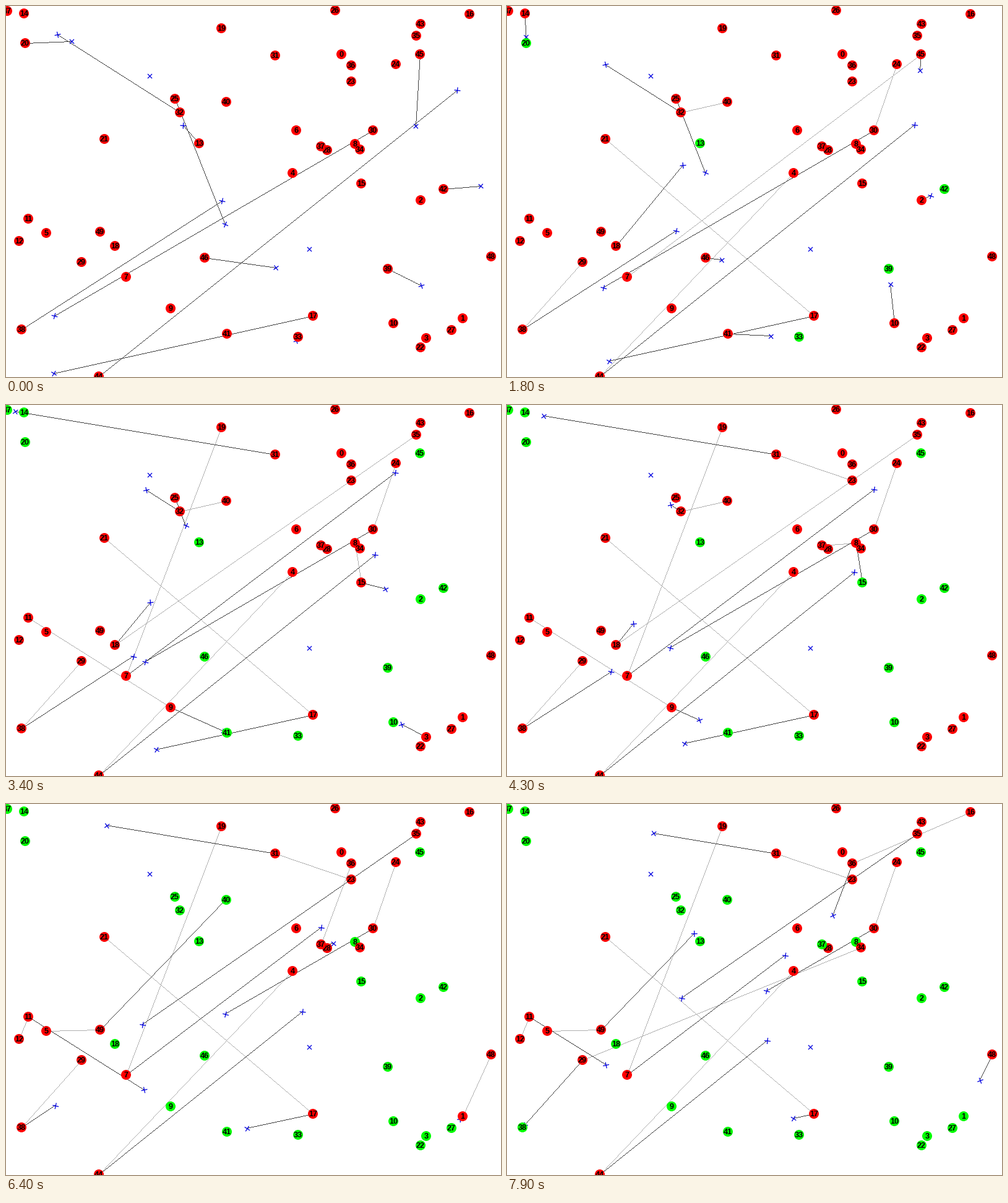
Recreate the animation shown at these times as a matplotlib script. Size 800 by 600 pixels, loop 8000 ms.

```python
import numpy as np
import matplotlib.pyplot as plt
from matplotlib.animation import FuncAnimation
from matplotlib.collections import LineCollection
from matplotlib.patches import Circle

W, H, DPI = 800, 600, 100
FRAMES, INTERVAL = 80, 100
SPEED, REACH, PLAN_EVERY = 5, 3.5, 10
PX = 72 / DPI
RED, GREEN, BLUE = "#ff0000", "#00ff00", "#0000e0"
NOW_GRAY, LATER_GRAY = 64, 176

# scattered task sites, labelled by their index
TASKS = np.array([
    (542, 78), (738, 505), (670, 314), (679, 537), (463, 270),
    (65, 367), (469, 201), (194, 438), (564, 223), (266, 489),
    (626, 513), (36, 344), (21, 380), (312, 222), (29, 12),
    (574, 287), (749, 13), (496, 501), (176, 388), (348, 36),
    (31, 60), (159, 215), (670, 552), (558, 122), (630, 94),
    (273, 150), (532, 7), (720, 524), (519, 233), (122, 414),
    (593, 201), (435, 80), (281, 172), (472, 535), (572, 232),
    (663, 48), (558, 96), (509, 227), (25, 523), (617, 425),
    (356, 155), (357, 530), (707, 296), (670, 29), (150, 599),
    (669, 78), (321, 407), (2, 8), (784, 405), (152, 365),
], float)
SPARE = {0, 6, 26, 28}


class Robot:
    """Visits its stops, then makes some hops to the nearest open task."""

    def __init__(self, x, y, stops=(), hops=0):
        self.pos = np.array([x, y], float)
        self.queue = list(stops)
        self.hops = hops
        self.step = 0
        self.angle = 0.0

    def plan(self, free):
        for _ in range(self.hops):
            here = TASKS[self.queue[-1]]
            task = min(free, key=lambda k: np.hypot(*(TASKS[k] - here)))
            self.queue.append(task)
            free.remove(task)

    def task(self, t, ahead=0):
        """Task number, once its planning round has come."""
        k = self.step + ahead
        if k < len(self.queue) and t >= k * PLAN_EVERY:
            return self.queue[k]
        return None

    def face(self, t):
        task = self.task(t)
        if task is not None:
            dx, dy = TASKS[task] - self.pos
            self.angle = np.arctan2(dy, dx)

    def advance(self, t, done):
        task = self.task(t)
        if task is None:
            return
        gap = TASKS[task] - self.pos
        dist = np.hypot(*gap)
        if dist < REACH:
            done.add(task)
            self.step += 1
        else:
            self.pos = self.pos + gap / dist * SPEED
        self.face(t)

    def cross(self):
        mid = self.pos + 0.5
        for turn in (np.pi / 4, -np.pi / 4):
            a = self.angle + turn
            arm = 5 * np.array([np.cos(a), np.sin(a)])
            yield [mid - arm, mid + arm]


def make_robots():
    robots = [
        Robot(83, 46, [32, 40, 49], hops=1),
        Robot(106, 57, [20, 14, 47, 31, 23]),
        Robot(286, 193, [13, 18, 35], hops=1),
        Robot(469, 541, [33, 41, 9, 11], hops=1),
        Robot(349, 315, [38, 29, 34]),
        Robot(354, 353, [25]),
        Robot(436, 423, [46]),
        Robot(78, 501, [30, 24]),
        Robot(77, 594, [17, 21]),
        Robot(729, 136, [44, 4]),
        Robot(662, 194, [45, 7, 19]),
        Robot(767, 291, [42], hops=6),
        Robot(671, 452, [39], hops=6),
        Robot(232, 113),
        Robot(490, 393),
    ]
    taken = SPARE.union(*(r.queue for r in robots))
    free = [k for k in range(len(TASKS)) if k not in taken]
    for r in robots:
        r.plan(free)
        r.face(0)
    return robots


def snapshot(robots, t, done):
    now, later, marks = [], [], []
    for r in robots:
        a, b = r.task(t), r.task(t, 1)
        if a is not None:
            now.append((r.pos, TASKS[a]))
            if b is not None:
                later.append((TASKS[a], TASKS[b]))
        marks += r.cross()
    return now, later, marks, set(done)


def simulate():
    robots, done = make_robots(), set()
    states = [snapshot(robots, 0, done)]
    for t in range(1, FRAMES):
        for r in robots:
            r.advance(t, done)
        states.append(snapshot(robots, t, done))
    return states


def hairline(canvas, a, b, gray):
    """One-pixel line without smoothing."""
    a, b = np.floor(a), np.floor(b)
    n = int(np.abs(b - a).max()) + 1
    x, y = np.rint(np.linspace(a, b, n)).astype(int).T
    canvas[y.clip(0, H - 1), x.clip(0, W - 1)] = gray


STATES = simulate()

fig = plt.figure(figsize=(W / DPI, H / DPI), dpi=DPI, facecolor="white")
ax = fig.add_axes([0, 0, 1, 1])
paths = ax.imshow(np.full((H, W), 255, np.uint8), cmap="gray", vmin=0,
                  vmax=255, extent=(0, W, H, 0), interpolation="nearest",
                  aspect="auto", zorder=1)
ax.set_xlim(0, W)
ax.set_ylim(H, 0)
ax.axis("off")

crosses = LineCollection([], colors=BLUE, linewidths=1.3 * PX, zorder=3)
ax.add_collection(crosses, autolim=False)

discs = []
for i, (x, y) in enumerate(TASKS):
    z = 4 + i * 0.1
    discs.append(ax.add_patch(Circle((x, y), 8, lw=0, fc=RED, zorder=z)))
    ax.text(x, y + 4, str(i), ha="center", va="baseline", color="black",
            family="Liberation Sans", weight="bold", size=12.6 * PX,
            zorder=z + 0.05)


def draw(t):
    now, later, marks, done = STATES[t]
    canvas = np.full((H, W), 255, np.uint8)
    for lines, gray in ((later, LATER_GRAY), (now, NOW_GRAY)):
        for a, b in lines:
            hairline(canvas, a, b, gray)
    paths.set_data(canvas)
    crosses.set_segments(marks)
    for i, disc in enumerate(discs):
        disc.set_facecolor(GREEN if i in done else RED)
    return [paths, crosses, *discs]


anim = FuncAnimation(fig, draw, frames=FRAMES, interval=INTERVAL,
                     repeat=True, repeat_delay=0, blit=False)
plt.show()
```
